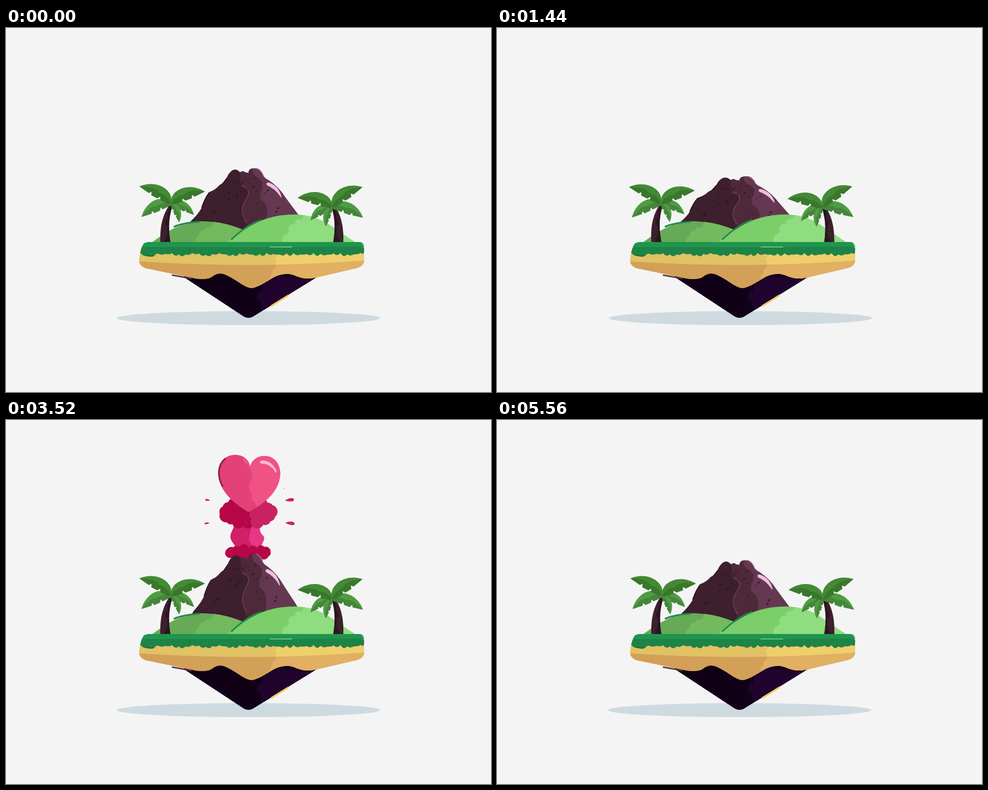
An HTML page that plays this animation: 864 by 648 pixels, repeating every 6960 ms.

```html
<!DOCTYPE html>
<html lang="en">
<head>
<meta charset="utf-8">
<title>Volcano island</title>
<style>
  html, body { margin: 0; height: 100%; overflow: hidden; background: #f4f4f4; }
  svg { display: block; width: 100vw; height: 100vh; }
  .line { fill: none; stroke-linecap: round; stroke-linejoin: round; }
</style>
</head>
<body>
<svg viewBox="0 0 864 648">
  <defs>
    <clipPath id="rockClip"><path d="M316 443L421 512Q432 520 443 512L553 444L500 420H360Z"/></clipPath>
    <clipPath id="sandClip"><path d="M239 399L237 413Q237 424 250 428L338 446Q360 449 368 442Q380 433 393 440C412 449 425 462 437 463C452 462 470 446 483 441Q500 435 513 440C530 447 538 447 553 444L626 427Q638 423 638 413V390H245Z"/></clipPath>
    <g id="trunk">
      <path fill="#3c202d" d="M275 382C274 350 280 332 291 315H297C288 342 290 362 293 382Z"/>
      <path fill="#2c1521" d="M281 382Q290 364 286 352Q280 345 288 338Q286 328 294 315H297C288 342 290 362 293 382Z"/>
    </g>
    <!-- A leaf of length 1, pointing right -->
    <g id="leaf">
      <path d="M0 0C.08 -.36 .66 -.42 1 0L.68 .04L.63 -.03L.59 .06L.4 .06L.35 -.02L.31 .06L.06 .06Z"/>
      <path fill="#000" fill-opacity=".14" d="M0 0Q.2 -.16 .42 -.1Q.6 -.22 1 0L.68 .04L.63 -.03L.59 .06L.4 .06L.35 -.02L.31 .06L.06 .06Z"/>
    </g>
    <g id="crown">
      <g fill="#4f9c43">
        <use href="#leaf" transform="rotate(155) scale(58 -58)"/>
        <use href="#leaf" transform="rotate(27) scale(46)"/>
        <use href="#leaf" transform="rotate(67) scale(37)"/>
      </g>
      <g fill="#438a34">
        <use href="#leaf" transform="rotate(208) scale(64 -64)"/>
        <use href="#leaf" transform="rotate(-19) scale(64)"/>
      </g>
    </g>
  </defs>

  <ellipse id="shadow" cx="432" cy="516.5" rx="234.5" ry="12.5" fill="#cedae0"/>

  <g id="island">
    <g clip-path="url(#rockClip)">
      <path fill="#110117" d="M300 410H570V520H300Z"/>
      <path fill="#20042d" d="M466 440Q458 456 456 468Q446 471 447 479Q448 486 454 486Q453 494 460 503L480 510L570 450Z"/>
    </g>
    <path class="line" stroke="#f0c95c" stroke-width="3" d="M473 494.500L502 476.500"/>

    <g clip-path="url(#sandClip)">
      <path fill="#e1c264" d="M230 385H640V470H230Z"/>
      <path fill="#efcf6b" d="M484 395Q487 403 481 408Q477 412 482 416L480 424H640V390Z"/>
      <path fill="#d3a058" d="M230 415Q330 422 435 422Q550 421 640 414V470H230Z"/>
      <path fill="#e1b062" d="M481 421.500Q481 427 475 430Q476 437 471 441Q471 446 464 452V470H640V414Q560 420 481 421.500Z"/>
    </g>
    <path class="line" stroke="#5a2f3d" stroke-width="2.600" d="M296.500 440L330 446"/>

    <g id="column">
      <path fill="#d11f68" d="M404 176C412 190 398 199 400 210C402 220 411 223 412 234V250H452V234C453 222 462 215 459 207C450 200 451 190 455 178Z"/>
      <path fill="#e73688" d="M434 176C442 195 429 208 434 216Q440 224 438 234H452C453 222 462 215 459 207C450 200 451 190 455 178Z"/>
    </g>
    <g id="cloud"></g>
    <g id="base"></g>
    <g id="drops" fill="#c92364"></g>
    <g id="heart">
      <path fill="#e34178" d="M432 164C405 148 378 125 378 94C378 72 392 61 408 61C423 61 433 70 435 82C438 70 448 63 461 63C478 63 490 77 489 97C487 125 465 146 432 164Z"/>
      <path fill="#ef5283" d="M422 65Q422 76 431 80Q440 92 438 105Q430 114 434 124Q440 132 437 142Q444 145 447 155C470 140 487 122 489 97C490 77 478 63 461 63C448 63 438 70 435 82Q431 69 422 65Z"/>
      <path class="line" stroke="#8c2149" stroke-width="3" d="M390 68C377 79 375 98 385 117"/>
      <path fill="#fab6d0" d="M455 71Q474 70 483 91Q481 95 479 90Q470 77 455 77Q450 74 455 71Z"/>
    </g>
    <g id="ring" fill="#c4215f"></g>

    <g id="volcano">
      <path fill="#3d1f2d" d="M300 390L329 344Q347 327 351 314Q355 301 364 291Q372 289 380 280Q390 274 393 267Q397 257 404 253Q411 250 417 257Q422 253 426 257L432 258Q432 251 439 250Q449 248 455 257Q459 267 468 271Q486 283 498 302L521 333L555 390Z"/>
      <path fill="#4e293a" d="M417 257Q422 253 426 257L432 258Q432 251 439 250L470 290V390H424L428 350Q416 327 424 310Q438 295 428 287Q417 281 418 267Z"/>
      <path fill="#653852" d="M439 250Q449 248 455 257Q459 267 468 271Q486 283 498 302L521 333L555 390H458L466 325Q463 310 454 306Q450 298 456 287Q459 274 450 267Q438 263 439 250Z"/>
      <path class="line" stroke="#75475f" stroke-width="1.200" d="M420 281Q434 286 432 295C430 305 419 312 421 328Q423 338 429 345"/>
      <path class="line" stroke="#2e1421" stroke-width="2" d="M349 319Q354 304 362 293M387 276L393 268"/>
      <path class="line" stroke="#a56e91" stroke-width="1.400" d="M447 250Q455 253 459 264"/>
      <path fill="#f1c1df" d="M465 280Q462 275 468 275Q486 281 491 301Q490 303 488 299Q479 286 465 280Z"/>
      <g id="spots"></g>
    </g>

    <path fill="#66aa58" d="M258 383C288 361 315 344 350 344C385 345 405 352 424 360V383Z"/>
    <path fill="#73b95d" d="M369 345Q367 353 365 355Q354 354 352 361Q343 361 343 370Q336 374 337 383H424V360Q396 348 369 345Z"/>
    <path class="line" stroke="#1f8a4b" stroke-width="3" d="M300 353.500Q318 346 344 345"/>
    <path fill="#7bce69" d="M390 383C420 366 445 332 516 332C562 333 588 362 625 383Z"/>
    <path fill="#90dc80" d="M530 333Q529 341 524 340Q514 340 514 349Q503 348 503 358Q506 366 497 367Q490 374 493 383H625C591 363 570 338 530 333Z"/>
    <path class="line" stroke="#1f8a4b" stroke-width="2.800" d="M402 376Q431 349 454 342"/>

    <g id="palmLeft"><use href="#trunk"/><use href="#crown" transform="translate(294 312)"/></g>
    <g id="palmRight">
      <use href="#trunk" transform="translate(876 0) scale(-1 1)"/>
      <use href="#crown" transform="translate(581.5 318) rotate(-5) scale(-1 1)"/>
    </g>

    <path id="grass" fill="#1e8347"/>
    <path fill="#1f954d" d="M243 390Q246 381 254 381H630Q639 381 638 394Q635 389 626 389L510 390Z"/>
    <path class="line" stroke="#176b39" stroke-width="1.600" d="M243 403Q251 407 262 406"/>
    <path class="line" stroke="#7ed08b" stroke-width="1.600" d="M470 389.800H509"/>
    <path class="line" stroke="#8bd58d" stroke-width="1" d="M634 383.500Q637.500 385 637.500 391"/>
  </g>
</svg>

<script>
const LOOP = 6960, STEP = 40, TAU = 2 * Math.PI;
const DARK = '#b70747', ROSE = '#c92364';
const $ = id => document.getElementById(id);
const set = (id, transform) => $(id).setAttribute('transform', transform);
const show = (id, on) => $(id).setAttribute('visibility', on ? 'visible' : 'hidden');
const clamp = x => Math.max(0, Math.min(1, x));
const repeat = (n, make) => Array.from({ length: n }, (_, i) => make(i)).join('');

// Smooth step from 0 to 1 between two times.
function ease(t, from, to) {
  const u = clamp((t - from) / (to - from));
  return u * u * (3 - 2 * u);
}

function seeded(seed) {
  return () => (seed = seed * 16807 % 2147483647) / 2147483647;
}

const scaleAt = (x, y, sx, sy, dy = 0) =>
  `translate(${x} ${y + dy}) scale(${sx} ${sy}) translate(${-x} ${-y})`;

// An ellipse edged with round lobes; the part right of the middle takes the second colour.
function puffs(id, { x, y, rx, ry, r, count, left, right }) {
  const lobe = i => {
    const a = TAU * (.25 + i / count);
    const cx = x + rx * Math.cos(a), cy = y + ry * Math.sin(a);
    return `<circle cx="${cx}" cy="${cy}" r="${r * (1 + .15 * Math.sin(i * 2.4))}" fill="${cx > x + 3 ? right : left}"/>`;
  };
  $(id).innerHTML = `<ellipse cx="${x}" cy="${y}" rx="${rx}" ry="${ry}" fill="${left}"/>` +
    `<path d="M${x + 3} ${y - ry}A${rx - 3} ${ry} 0 0 1 ${x + 3} ${y + ry}Z" fill="${right}"/>` + repeat(count, lobe);
}
puffs('cloud', { x: 431, y: 165, rx: 41, ry: 18, r: 10.5, count: 15, left: DARK, right: ROSE });
puffs('base', { x: 432, y: 236, rx: 33, ry: 6, r: 8, count: 13, left: DARK, right: DARK });

const random = seeded(29);
$('spots').innerHTML = repeat(26, () => {
  const y = 268 + 62 * random();
  const x = 432 + (2 * random() - 1) * (y - 243) * .85;
  const r = 1.2 + 1.2 * random();
  return `<ellipse rx="${r}" ry="${r * .75}" fill="${x < 424 ? '#2c1420' : '#3d1d2e'}" transform="translate(${x} ${y}) rotate(-40)"/>`;
});

// Ragged lower edge of the grass.
const scallop = i => {
  const x = 272 + i * 12;
  return `Q${x + 6} ${407 + 3 * Math.sin(x * 1.7)} ${x + 12} ${402 + 1.5 * Math.sin(x * .9)}`;
};
$('grass').setAttribute('d', 'M246 383Q241 390 239 400Q243 407 264 406Q267 401 272 402' +
  repeat(30, scallop) + 'Q638 405 638 396V388Q636 382 628 382H252Z');

// Three splashes to each side, flying outward again and again.
function drawDrops(t) {
  const p = ((t - 2440) % 600) / 600;
  const reach = .5 + .625 * p, fade = Math.min(1, (1 - p) * 5, p * 5);
  $('drops').innerHTML = repeat(6, i => {
    const side = i % 2 ? 1 : -1, rank = i >> 1;
    const a = -.3 + .55 * rank - .7 * (rank > 1) * rank;
    const size = (side > 0 ? .9 : .5) * (rank > 1 ? .15 : 1) * fade;
    const x = 432 + side * 76 * reach * Math.cos(a), y = 165 + 76 * reach * Math.sin(a);
    return `<path d="M-9 0Q0 -5 7 -3Q12 0 7 3Q0 4 -9 0Z" transform="translate(${x} ${y}) scale(${side * size} ${size}) rotate(${a * 25})"/>`;
  });
}

// Broken ring of slivers that get shorter towards its left side.
function drawRing(t) {
  const r = 71 + (t - 4400) * .06, width = 4 * clamp((4520 - t) / 120);
  const at = (a, d) => `${430 + d * Math.cos(a)} ${136 + d * Math.sin(a)}`;
  let slivers = '', span;
  for (let a = -.25; a < TAU - .4; a += span * 1.45) {
    span = .34 - .22 * Math.max(0, -Math.cos(a)) ** 8;
    const bend = r / Math.cos(span / 2) - 2 * width;
    slivers += `<path d="M${at(a, r)}A${r} ${r} 0 0 1 ${at(a + span, r)}Q${at(a + span / 2, bend)} ${at(a, r)}Z"/>`;
  }
  $('ring').innerHTML = slivers;
}

// Damped swing that follows a push.
function jolt(t, start, strength) {
  const s = t - start;
  if (s < 0 || s > 640) return 0;
  return strength * Math.exp(-s / 158) * Math.sin(TAU * s / 560) * clamp((640 - s) / 150);
}
const push = t => jolt(t, 20, -48) + jolt(t, 4410, 65);

function draw(t) {
  // The island trembles on its tip before the eruption.
  const tremor = clamp((t - 560) / 160) * clamp((2160 - t) / 80);
  const wave = Math.sin(TAU * (t - 1000) / 376 - .42);
  const sway = push(t - 80) * .11 + tremor * (wave - 2);
  set('shadow', `translate(${push(t) + tremor * (.5 + 2.5 * wave)} 0)`);
  set('island', `rotate(${push(t) * .15 + tremor * (.5 * wave - .3)} 432 516)`);
  set('palmLeft', `rotate(${sway} 284 382)`);
  set('palmRight', `rotate(${sway} 593 382)`);

  const pop = ease(t, 2020, 2160), grow = ease(t, 2400, 3520);
  const burst = ease(t, 4320, 4400), sink = ease(t, 4400, 5520);

  const tall = 1 - .097 * ease(t, 20, 400) - .01 * wave * tremor + .179 * ease(t, 2000, 2140) - .082 * ease(t, 4420, 5300);
  set('volcano', scaleAt(432, 390, 1 - .6 * (tall - 1), tall));

  // The heart swells in three pumps of falling strength.
  const pump = i => ease(t, 2400 + 640 * i, 2880 + 640 * i) * (.18 - .06 * i);
  const size = .69 * pop + pump(0) + pump(1) + pump(2);
  set('heart', scaleAt(432, 164, size, size, 106 * (1 - pop) + 8 * (1 - grow)));

  set('cloud', scaleAt(432, 194,
    .3 + .59 * pop + .11 * grow - .25 * burst - .6 * sink,
    .3 + .61 * pop + .09 * grow + .2 * burst - .5 * sink,
    90 - 83 * pop - 7 * grow + 42 * burst + 62 * sink));
  set('column', `translate(0 ${80 - 73 * pop - 7 * grow + 40 * burst})`);
  const puff = .2 + .75 * pop + .05 * grow - .8 * sink;
  set('base', scaleAt(432, 250, puff, puff));

  const during = (from, to) => t >= from && t < to;
  show('cloud', during(2040, 5480));
  show('base', during(2040, 5480));
  show('column', during(2040, 4400));
  show('heart', during(2040, 4340));
  show('drops', during(2880, 4300));
  show('ring', during(4360, 4520));
  drawDrops(t);
  drawRing(t);
}

function tick() {
  draw(Math.floor((performance.now() % LOOP) / STEP) * STEP);
  requestAnimationFrame(tick);
}
tick();
</script>
</body>
</html>
```
